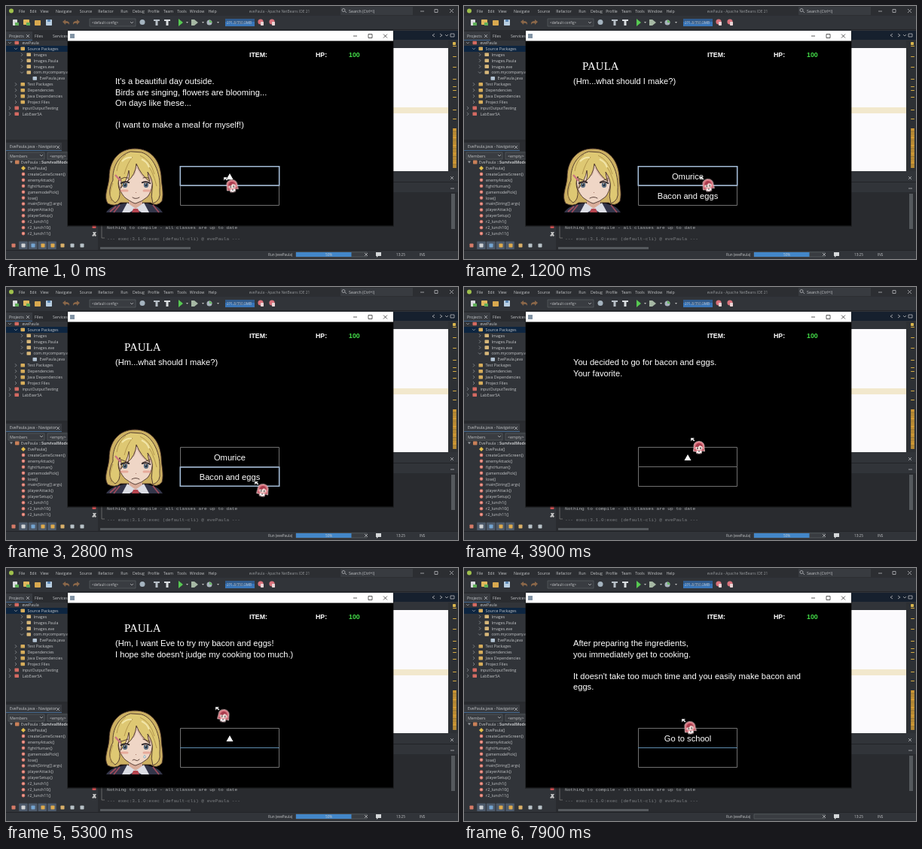
These frames come from a looping animation (600 by 337 pixels, 8000 ms). An HTML page:

```html
<!DOCTYPE html>
<html lang="en">
<head>
<meta charset="utf-8">
<title>Lunch game in the IDE</title>
<style>
html, body { margin: 0; height: 100%; overflow: hidden; background: #313439; }
svg { display: block; width: 100vw; height: 100vh; }
text { white-space: pre; }
.ui text { font: 5.3px "Open Sans", "Noto Sans", sans-serif; fill: #c3c5c7; }
.ui .menu { font-size: 5.2px; text-anchor: middle; }
.ui .title { font-size: 4.9px; text-anchor: middle; fill: #94979a; }
.ui .status { font-size: 4.7px; }
.ui .bold { font-weight: bold; }
.ui .mono { font: 6.15px "Liberation Mono", monospace; fill: #a9acae; }
.ui .dim { fill: #7c7f82; }
.game text { font: 11.15px "Liberation Sans", Arial, sans-serif; fill: #fff; }
.game .stat { font-size: 8.8px; font-weight: bold; }
.game .name { font: 15px "Liberation Serif", Times, serif; }
.game .mid { text-anchor: middle; }
.line { fill: none; stroke: #4a332b; stroke-width: .9; stroke-linecap: round; stroke-linejoin: round; }
.hover { fill: none; stroke: #a3bbd6; stroke-width: 1.6; }

.page, .hover, .blush, .bar { animation: 8s step-end infinite; }
.page, .hover, .blush { visibility: hidden; }
#p1 { animation-name: p1; }
#p2 { animation-name: p2; }
#p3 { animation-name: p3; }
#p4 { animation-name: p4; }
#p5 { animation-name: p5; }
#h1 { animation-name: h1; }
#h2, .blush { animation-name: h2; }
.bar { animation-name: bar; }
@keyframes p1 { 0% { visibility: visible } 7.5%, 100% { visibility: hidden } }
@keyframes p2 { 0% { visibility: hidden } 7.5% { visibility: visible } 40%, 100% { visibility: hidden } }
@keyframes p3 { 0% { visibility: hidden } 40% { visibility: visible } 52.5%, 100% { visibility: hidden } }
@keyframes p4 { 0% { visibility: hidden } 52.5% { visibility: visible } 73.75%, 100% { visibility: hidden } }
@keyframes p5 { 0% { visibility: hidden } 73.75%, 100% { visibility: visible } }
@keyframes h1 {
  0% { visibility: visible } 18% { visibility: hidden }
  50.8% { visibility: visible } 58% { visibility: hidden }
  70.5% { visibility: visible } 79.5%, 100% { visibility: hidden }
}
@keyframes h2 { 0% { visibility: hidden } 18% { visibility: visible } 43%, 100% { visibility: hidden } }
@keyframes bar { 0% { visibility: visible } 73.75%, 100% { visibility: hidden } }

#cursor { animation: move 8s ease-in-out infinite; }
#doll { animation: rock .6s step-end infinite; }
@keyframes move {
  0% { transform: translate(290px, 230px) }
  9% { transform: translate(291px, 230px) }
  15% { transform: translate(314px, 229px) }
  21% { transform: translate(332px, 262px) }
  35%, 41% { transform: translate(331px, 261px) }
  46%, 48.75% { transform: translate(302px, 203px) }
  52%, 55% { transform: translate(292px, 221px) }
  62%, 66.25% { transform: translate(279px, 187px) }
  72% { transform: translate(294px, 221px) }
  77.5% { transform: translate(296px, 222px) }
  83%, 100% { transform: translate(290px, 203px) }
}
@keyframes rock {
  0% { transform: translate(10px, 9px) rotate(-9deg) }
  33% { transform: translate(10px, 10px) }
  66% { transform: translate(10px, 9px) rotate(9deg) }
}
</style>
</head>
<body>
<svg viewBox="0 0 600 337" preserveAspectRatio="none">
  <defs>
    <g id="girl">
      <path class="line" style="fill:#cdb163" d="M171 190C149 190 137 207 137 228C136 242 129 253 135 263Q145 268 152 262H192Q200 268 207 260C210 248 206 238 206 226C204 206 193 190 171 190Z"/>
      <path fill="#34364a" d="M133 275Q138 266 157 263H188Q203 266 208 275Z"/>
      <path d="M138 274l8-7M143 275l8-10M195 265l8 10" stroke="#9c4b5c" stroke-width="1.800"/>
      <path fill="#d9ae9b" d="M163 255h18v11l-9 6-9-6Z"/>
      <path fill="#dcdde4" d="M161 262l11 8-8 5h-10ZM183 262l-11 8 8 5h10Z"/>
      <path fill="#b5444f" d="M169 270h6l2 5h-10Z"/>
      <path class="line" style="fill:#efd6c6" d="M149 222C148 240 152 250 159 256Q169 263 172 263Q180 261 188 254C195 245 196 232 193 216Q170 205 149 222Z"/>
      <path fill="#d6b3a4" d="M150 225Q158 236 162 223Q172 233 173 214Q181 232 193 234L192 214 150 217Z"/>
      <path class="line" style="fill:#dec873" d="M165 194C149 199 141 215 142 232C135 246 137 257 145 262Q152 258 151 246Q147 236 151 227Q155 236 152 243Q161 232 163 219Q165 228 161 234Q172 225 173 210Q179 225 191 234Q188 226 188 221Q196 232 194 244Q192 254 195 263Q206 259 204 246C206 222 195 199 180 195Z"/>
      <path d="M159 198Q149 206 147 220M178 199Q192 205 197 224M184 207Q195 218 200 240M142 236Q136 249 140 260M168 201Q161 209 157 224" fill="none" stroke="#a98a45" stroke-width=".8"/>
      <path d="M154 207q6-6 13-5M180 204q8 4 10 11" fill="none" stroke="#f2e6a8" stroke-width="2"/>
      <path d="M145 225l7 8" stroke="#c97380" stroke-width="2.300"/>
      <path d="M152 236.500q6-4 12-1M180 235.500q7-3 12 1" fill="none" stroke="#2c2428" stroke-width="1.900"/>
      <path fill="#5d7083" d="M155 236h6q1 6-3 6q-4 0-3-6ZM183 236h6q1 6-3 6q-4 0-3-6Z"/>
      <path d="M158 236v4M186 236v4" stroke="#222c38" stroke-width="2.500"/>
      <path d="M157 237h1M185 237h1" stroke="#fff"/>
      <path d="M172 248l1 1" stroke="#a87868"/>
    </g>
    <path id="flush" d="M153 246h8M183 246h8" stroke="#e29483" stroke-width="3" stroke-linecap="round" opacity=".65"/>
  </defs>

  <g class="ui">
    <path fill="#313439" d="M0 0h600v337H0Z"/>
    <path fill="#2c2e32" d="M0 0h600v13H0Z"/>
    <path fill="#383b40" d="M444 1h96v11h-96Z"/>
    <path fill="#2a2c30" d="M0 32h82v14H0ZM0 181h82v12H0Z"/>
    <path fill="#16202e" d="M514 33h86v12h-86Z"/>
    <path fill="#383b40" d="M0 34h35v11H0ZM0 182h74v11H0Z"/>
    <path fill="#4a78aa" d="M0 45h35v.7H0ZM0 192h74v.7H0Z"/>
    <path fill="#0d2540" d="M0 53h82v8H0Z"/>
    <path fill="#292b2f" d="M0 178h82v3H0ZM122 235h478v90H122Z"/>
    <path fill="#313439" d="M514 235h86v13h-86Z"/>
    <path fill="#fbfafd" d="M514 56h73v164h-73Z"/>
    <path fill="#f2e8cd" d="M514 135h73v8h-73Z"/>
    <path fill="#2d3034" d="M587 46h13v174h-13Z"/>
    <path fill="#55595d" d="M591 250h5v47h-5ZM125 321h120v3H125Z"/>
    <path stroke="#222428" d="M0 325.500h600M82 31.500h518M514 234.500h86"/>
    <g id="shell"></g>
    <g fill="#393c41" stroke="#5b5f64" stroke-width=".7">
      <path d="M111 17h61v10h-61ZM3 195h48v9H3ZM55 195h27v9H55Z"/>
      <path d="M385 328h94v6h-94Z"/>
    </g>
    <path fill="#3975b8" d="M291 17h39v10h-39Z"/>
    <path fill="#2f5a8c" d="M291 17h39v4h-10l-6 3h-9l-7-3h-7Z"/>
    <path class="bar" fill="#4387c9" d="M385 328h73.500v6h-73.500Z"/>
    <g id="labels"></g>
    <g fill="none" stroke="#b5b7ba" stroke-width=".8">
      <path d="M550 7h5M569 4.500h4v4h-4ZM589 4l5 5M594 4l-5 5M450 7l2 2M165 21l2 2 2-2M45 198l2 2 2-2"/>
      <circle cx="448" cy="5.500" r="2"/>
      <path d="M569 37l-3 2 3 2M576 37l3 2-3 2M583 38l2 2 2-2M590 37h5v4h-5ZM590 243h5M590 227l4 4M594 227l-4 4M476 329l4 4M480 329l-4 4M27 38l4 4M31 38l-4 4M67 186l4 4M71 186l-4 4"/>
      <path stroke="#777" d="M127 292v17h4"/>
    </g>
    <path fill="#d5d8da" d="M491 328h7v5h-4l-2 2v-2h-1Z"/>
  </g>

  <g class="game">
    <path fill="#111" opacity=".4" d="M81 33h434v261H81Z"/>
    <path d="M82 46h432v246.500H82Z"/>
    <path fill="#fff" d="M82 33h432v13.500H82Z"/>
    <path fill="#8294a5" d="M85 37h6v6h-6Z"/>
    <path fill="none" stroke="#333" stroke-width=".8" d="M461 40h5M481 37.500h5v5h-5ZM501 37.500l5 5M506 37.500l-5 5"/>
    <text class="stat" x="323" y="67.500">ITEM:</text>
    <text class="stat" x="411" y="67.500">HP:</text>
    <text class="stat" x="455" y="67.500" style="fill:#43dc48">100</text>
    <path fill="none" stroke="#707070" d="M231.500 213.500h131v26h-131ZM231.500 239.500v26h131v-26"/>

    <g class="page" id="p1">
      <text x="145" y="104">It's a beautiful day outside.</text>
      <text x="145" y="118.500">Birds are singing, flowers are blooming...</text>
      <text x="145" y="133">On days like these...</text>
      <text x="145" y="162">(I want to make a meal for myself!)</text>
      <use href="#girl"/><use href="#flush"/>
      <path class="line" d="M153 230q4-3 9-1M182 229q5-2 8 1M168 255q4 3 9 0"/>
      <path fill="#fff" d="M297 223l4.500 8h-9Z"/>
    </g>
    <g class="page" id="p2">
      <text class="name" x="157" y="84.500">PAULA</text>
      <text x="145" y="104">(Hm...what should I make?)</text>
      <use href="#girl"/><use class="blush" href="#flush"/>
      <path class="line" d="M153 230l10 4M181 234l10-4M167 256q5-3 10 0"/>
      <text class="mid" x="297" y="231">Omurice</text>
      <text class="mid" x="297" y="257">Bacon and eggs</text>
    </g>
    <g class="page" id="p3">
      <text x="145" y="104">You decided to go for bacon and eggs.</text>
      <text x="145" y="118.500">Your favorite.</text>
      <path fill="#fff" d="M297 223l4.500 8h-9Z"/>
    </g>
    <g class="page" id="p4">
      <text class="name" x="157" y="84.500">PAULA</text>
      <text x="145" y="104">(Hm, I want Eve to try my bacon and eggs!</text>
      <text x="145" y="118.500">I hope she doesn't judge my cooking too much.)</text>
      <use href="#girl"/><use href="#flush"/>
      <path class="line" d="M153 231l9-3M182 228l9 3M168 256q2-2 4 0t5-1"/>
      <path d="M184 249q-3 4 0 4t0-4" fill="#cfe5ee" stroke="#6f8c99" stroke-width=".5"/>
      <path fill="#fff" d="M297 223l4.500 8h-9Z"/>
      <path stroke="#5e8caf" d="M231 239.500h132"/>
    </g>
    <g class="page" id="p5">
      <text x="145" y="104">After preparing the ingredients,</text>
      <text x="145" y="118.500">you immediately get to cooking.</text>
      <text x="145" y="147.500">It doesn't take too much time and you easily make bacon and</text>
      <text x="145" y="162">eggs.</text>
      <text class="mid" x="297" y="231">Go to school</text>
      <path stroke="#5e8caf" d="M231 239.500h132"/>
    </g>
    <path class="hover" id="h1" d="M231.300 213.800h131.400v25.200h-131.400Z"/>
    <path class="hover" id="h2" d="M231.300 240h131.400v25.200h-131.400Z"/>

    <g id="cursor">
      <path fill="#f4f4f4" stroke="#333" stroke-width=".4" d="M-1-2h5l-1.500 1.500 2 2-1.500 1-2-2-2 2Z"/>
      <g id="doll">
        <path fill="#dd7c86" stroke="#f3e3e3" stroke-width=".6" d="M-7 1Q-8-7 0-7.500Q8-7 7 2L7.500 6 4 5 3 9H-3L-4 6-7.500 6Z"/>
        <ellipse cy="1" rx="4.500" ry="3.300" fill="#f6e4de"/>
        <path fill="#a93a4c" d="M-5 0Q-4-5 0-5T5 0L1-2-1 0ZM-6 3l2 2-2 0ZM6 3l-2 2h2Z"/>
        <path fill="#fff" d="M-3 5h6v3.500h-6Z"/>
        <path d="M-2 .5v2.500M2 .5v2.500M-3 9h2M1 9h2M-1 6h2" stroke="#33262b" stroke-width="1.200"/>
      </g>
    </g>
  </g>
</svg>
<script>
const shell = document.getElementById('shell');
const labels = document.getElementById('labels');

function add(parent, tag, attrs, content = '') {
  const el = document.createElementNS('http://www.w3.org/2000/svg', tag);
  for (const key in attrs) el.setAttribute(key, attrs[key]);
  el.textContent = content;
  parent.append(el);
}
const label = (x, y, s, cls = '') => add(labels, 'text', { x, y, class: cls }, s);
const box = (x, y, width, height, fill) => add(shell, 'rect', { x, y, width, height, fill, rx: .7 });
const dot = (cx, cy, r, fill) => add(shell, 'circle', { cx, cy, r, fill });
const shape = (d, fill) => add(shell, 'path', { d, fill });

// Menu bar
const menus = { File: 21, Edit: 36, View: 51, Navigate: 76.5, Source: 106, Refactor: 132.5, Run: 157,
  Debug: 176, Profile: 196, Team: 215.5, Tools: 233.5, Window: 253.5, Help: 274 };
for (const name in menus) label(menus[name], 8.5, name, 'menu');
label(363, 8.5, 'evePaula - Apache NetBeans IDE 21', 'title');
label(455, 8.5, 'Search (Ctrl+I)');
dot(7, 6.5, 3, '#9fc04c');

// Toolbar
box(9, 18, 6, 8, '#d8dadd');
shape('M12 22h5v4h-5Z', '#5fae57');
box(23, 18, 8, 7, '#e0b85c');
shape('M27 22h5v4h-5Z', '#5fae57');
box(38, 19, 8, 7, '#d9a94f');
box(53, 18, 8, 8, '#b9cfe2');
box(55, 18, 4, 3, '#5b87b5');
shape('M75 21l4-3v2q6 0 5 5-1-3-5-2v2Z', '#8a6749');
shape('M98 21l-4-3v2q-6 0-5 5 1-3 5-2v2Z', '#8a6749');
label(114, 24, '<default config>', 'status');
dot(181, 21.5, 3.5, '#a4b3bf');
shape('M196 18h8v2h-2.500v6h-3v-6h-2.500Z', '#b8c0c8');
shape('M210 18h8v2h-2.500v6h-3v-6h-2.500Z', '#d9dde0');
shape('M229 17l6 5-6 5Z', '#57c952');
shape('M246 18h4v8h-4ZM250 18l5 4-5 4Z', '#a6b8a4');
dot(270, 22, 3.5, '#a9b4bd');
shape('M270 18v4h4Z', '#62b85b');
for (const x of [239, 260, 280]) shape(`M${x} 21h3l-1.500 2Z`, '#bbb');
label(293, 24, '271.8/350.0MB', 'status');
for (const x of [338, 353]) {
  dot(x, 21, 3.6, '#d9727c');
  box(x, 21, 4, 5, '#e9d5d6');
}

// Project tree: depth, label, icon colour, arrow state
label(4, 41.5, 'Projects');
label(38, 41.5, 'Files');
label(62, 41.5, 'Services');
const tree = [
  [0, 'evePaula', '#d46a62', 1], [1, 'Source Packages', '#d7ad5b', 1],
  [2, 'Images', '#d7b779', 2], [2, 'Images.Paula', '#d7b779', 2], [2, 'Images.eve', '#d7b779', 2],
  [2, 'com.mycompany.evePaula', '#d7b779', 1], [3, 'EvePaula.java', '#b3c4d4', 0],
  [1, 'Test Packages', '#d7ad5b', 2], [1, 'Dependencies', '#d7ad5b', 2],
  [1, 'Java Dependencies', '#d7ad5b', 2], [1, 'Project Files', '#d7ad5b', 2],
  [0, 'inputOutputTesting', '#d46a62', 2], [0, 'LabExer5A', '#d46a62', 2]
];
tree.forEach(([depth, name, fill, arrow], i) => {
  const x = 5 + depth * 8, y = 49 + i * 7.9;
  if (arrow) {
    const d = arrow === 1 ? `M${x - 2} ${y - 1}l2 2 2-2` : `M${x - 1} ${y - 2}l2 2-2 2`;
    add(shell, 'path', { d, fill: 'none', stroke: '#92969a', 'stroke-width': .8 });
  }
  box(x + 6.5, y - 2.3, 5.5, 4.6, fill);
  label(x + (depth ? 15.5 : 16.5), y + 1.9, name);
});

// Navigator
label(5, 189, 'EvePaula.java - Navigator');
label(5, 201.5, 'Members');
label(58, 201.5, '<empty>');
shape('M5 206.500h4l-2 3Z', '#92969a');
box(12, 205.5, 5.5, 5, '#c98059');
label(20, 210, 'EvePaula ::');
label(47, 210, 'SurvivalMode', 'bold');
const members = ['EvePaula()', 'createGameScreen()', 'enemyAttack()', 'fightHuman()', 'gamemodePick()',
  'lose()', 'main(String[] args)', 'playerAttack()', 'playerSetup()', 'r2_lunch1()', 'r2_lunch10()', 'r2_lunch11()'];
members.forEach((name, i) => {
  const y = 216 + i * 7.92;
  if (i) {
    dot(23, y, 2.3, '#dc796d');
    dot(23, y, .8, '#f5cec4');
  } else shape(`M23 ${y - 3}l3 3-3 3-3-3Z`, '#e3bd4b');
  label(29, y + 1.9, name);
});
for (let i = 1; i < 5; i++) box(4.5 + i * 12.7, 313.5, 11.5, 10.5, '#4d5a6b');
['#d67b68', '#d1d3d5', '#74a5d2', '#dfaa4b', '#dfaa4b', '#d9b06a', '#b8c2c8', '#b8c2c8']
  .forEach((fill, i) => box(7.5 + i * 13, 316.5, 5, 5, fill));

// Error stripe
for (const y of [53, 67, 81, 97, 107, 112, 121, 138, 150]) box(593, y, 5, 1, '#d9ae42');
for (let y = 163; y < 215; y += 2.2) box(593, y, 5, 1.9, '#d99f34');
box(593, 48, 4, 4, '#d9b54c');

// Output and status line
box(114.5, 292, 5, 4, '#cf5153');
shape('M115 301h2l3 5-2 1ZM118 301h2l-4 6-2-1Z', '#c5c5c5');
label(134, 296.5, 'Nothing to compile - all classes are up to date', 'mono');
label(134, 311.5, '--- exec:3.1.0:exec (default-cli) @ evePaula ---', 'mono dim');
label(348, 333, 'Run (evePaula)', 'status');
add(labels, 'text', { x: 424, y: 333, class: 'bar status' }, '50%');
label(518, 333, '13:25', 'status');
label(549, 333, 'INS', 'status');
</script>
</body>
</html>
```
